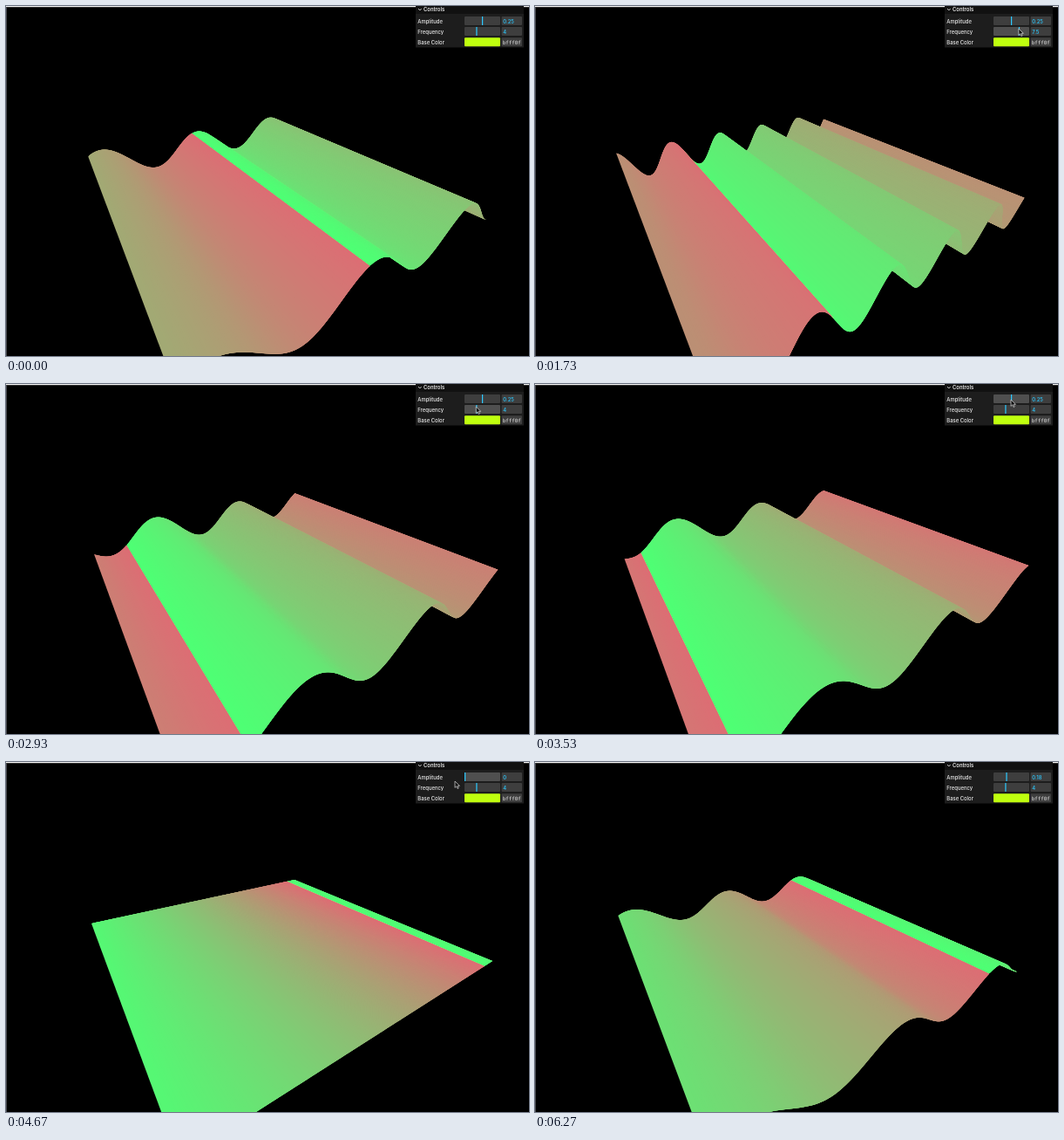
These frames come from a looping animation (600x401 px, 6.3 s). An HTML page with a canvas:

```html
<!DOCTYPE html>
<html lang="en">
<head>
<meta charset="utf-8">
<title>Wave plane</title>
<style>
  html, body { margin: 0; width: 100%; height: 100%; overflow: hidden; background: #000; }
  canvas, svg { position: absolute; left: 0; top: 0; width: 600px; height: 401px; }
  text { font: 500 5.9px Inter, "Liberation Sans", sans-serif; fill: #ebebeb; }
  .title { font-weight: 600; }
  .value { fill: #2cc9ff; }
  .mono { font: 5.8px "DejaVu Sans Mono", "Liberation Mono", monospace; }
  .field { fill: #3e3e3e; }
  .field.on { fill: #4f4f4f; }
  .handle { fill: #2cc9ff; }
</style>
</head>
<body>
<canvas id="stage" width="600" height="401"></canvas>
<svg viewBox="0 0 600 401">
  <rect width="600" height="1.2" fill="#f4f4f4"/>
  <rect y="1" width="1" height="400" fill="#4a4c52"/>
  <rect x="470" width="124" height="47.5" fill="#1d1d1d"/>
  <rect x="470" width="124" height="9" fill="#111"/>
  <path d="M473 3l1.8 2 1.8-2" fill="none" stroke="#ebebeb" stroke-width=".8"/>
  <text class="title" x="479" y="6.3">Controls</text>
  <text x="472.3" y="19.5">Amplitude</text>
  <text x="472.3" y="31.6">Frequency</text>
  <text x="472.3" y="43.7">Base Color</text>
  <rect class="field" id="ampField" x="526" y="12" width="41" height="10" rx="1"/>
  <rect class="field" id="freqField" x="526" y="24" width="41" height="10" rx="1"/>
  <rect x="526" y="36.3" width="41" height="10" rx="1" fill="#bfff0f"/>
  <rect class="field" x="568.5" y="12" width="23.5" height="10" rx="1"/>
  <rect class="field" x="568.5" y="24" width="23.5" height="10" rx="1"/>
  <rect class="field" x="568.5" y="36.3" width="23.5" height="10" rx="1"/>
  <rect class="handle" id="ampHandle" y="12" width="1.2" height="10"/>
  <rect class="handle" id="freqHandle" y="24" width="1.2" height="10"/>
  <text class="value" id="ampText" x="570.3" y="19.5"></text>
  <text class="value" id="freqText" x="570.3" y="31.6"></text>
  <text class="mono" x="569.8" y="43.5">bfff0f</text>
  <path id="cursor" d="M0 0V7.4L1.8 5.8 3 8.5 4.3 7.9 3.1 5.3H5.5Z" fill="#111" stroke="#ddd" stroke-width=".7"/>
</svg>
<script>
const LOOP = 6300;
const STEP = 1 / 400;
const OVERLAP = 4 * STEP;
const ctx = document.getElementById('stage').getContext('2d');
const el = id => document.getElementById(id);

// Eased rise from 0 to 1 between two times
function ramp(t, from, to) {
  const k = Math.min(1, Math.max(0, (t - from) / (to - from)));
  return k * k * (3 - 2 * k);
}

// Short hump around a time
const bump = (t, center, width) => Math.max(0, 1 - ((t - center) / width) ** 2);

const frequency = t =>
  4 + 3.5 * ramp(t, 1.15, 1.73) - 6.5 * ramp(t, 1.73, 2.25) + 3 * ramp(t, 2.55, 2.95);
const amplitude = t =>
  .25 + .17 * ramp(t, 3.65, 3.98) - .42 * ramp(t, 3.98, 4.45) + .18 * ramp(t, 4.85, 5.45);

// Perspective of a unit square with height z
function project(u, v, z) {
  const w = 1 + .41475 * u - .6132 * v - .3968 * z;
  return [
    (98 + 370.28 * u - 21.03 * v - 118.7 * z) / w,
    (185 + 5.99 * u - 8.23 * v - 339.4 * z) / w
  ];
}

// Green at 0, red at 1
const shade = g => `rgb(${78 + 144 * g} ${255 - 147 * g} 116)`;

function drawSurface(t, amp, freq) {
  const height = u => amp / 4 * Math.sin(4 * freq * (u - .5) + 2.55 + t);
  const at = (u, v) => project(u, v, height(u));
  const seam = (1.4145 - .1 * t) % 1;

  // Far strips first, so near crests hide what lies behind them
  function band(from, to, offset) {
    const count = Math.ceil((to - from) / STEP);
    for (let i = count - 1; i >= 0; i--) {
      const near = from + i * STEP;
      const far = Math.min(to, near + OVERLAP);
      ctx.fillStyle = shade(near - seam + offset);
      ctx.beginPath();
      ctx.moveTo(...at(near, 0));
      ctx.lineTo(...at(far, 0));
      ctx.lineTo(...at(far, 1));
      ctx.lineTo(...at(near, 1));
      ctx.fill();
    }
  }

  ctx.clearRect(0, 0, 600, 401);
  band(seam, 1, 0);
  ctx.strokeStyle = '#a8e880';
  ctx.beginPath();
  ctx.moveTo(...at(seam, 0));
  ctx.lineTo(...at(seam, 1));
  ctx.stroke();
  band(0, seam, 1);
}

function drawPanel(t, amp, freq) {
  const ampX = 526 + amp * 80;
  const freqX = 526 + (freq - 1) / 9 * 40;
  el('ampHandle').setAttribute('x', ampX);
  el('freqHandle').setAttribute('x', freqX);
  el('ampText').textContent = +amp.toFixed(2);
  el('freqText').textContent = +freq.toFixed(1);
  el('ampField').classList.toggle('on', (t > .6 && t < .88) || (t > 3.2 && t < 5.65));
  el('freqField').classList.toggle('on', t > .88 && t < 3.1);

  // The pointer follows the dragged handle and overshoots at the left stops
  const away = 1 - ramp(t, .35, .73);
  const leave = ramp(t, 5.55, 5.8);
  const toAmp = ramp(t, 2.95, 3.3);
  const pastFreq = bump(t, 2.4, .2);
  const pastAmp = bump(t, 4.67, .25);
  const x = freqX + (ampX - freqX) * toAmp + 32 * away + 34 * leave
    - 4 * bump(t, .73, .25) - 4 * pastFreq - 11 * pastAmp;
  const y = 13 + 13 * ramp(t, .73, 1) - 8 * toAmp - 11 * away - 28 * leave
    + 9 * pastFreq + 4 * pastAmp;
  el('cursor').setAttribute('transform', `translate(${x} ${y})`);
  el('cursor').style.display = t > .35 && t < 5.8 ? '' : 'none';
}

function frame() {
  const t = performance.now() % LOOP / 1000;
  const amp = amplitude(t), freq = frequency(t);
  drawSurface(t, amp, freq);
  drawPanel(t, amp, freq);
  requestAnimationFrame(frame);
}
frame();
</script>
</body>
</html>
```
